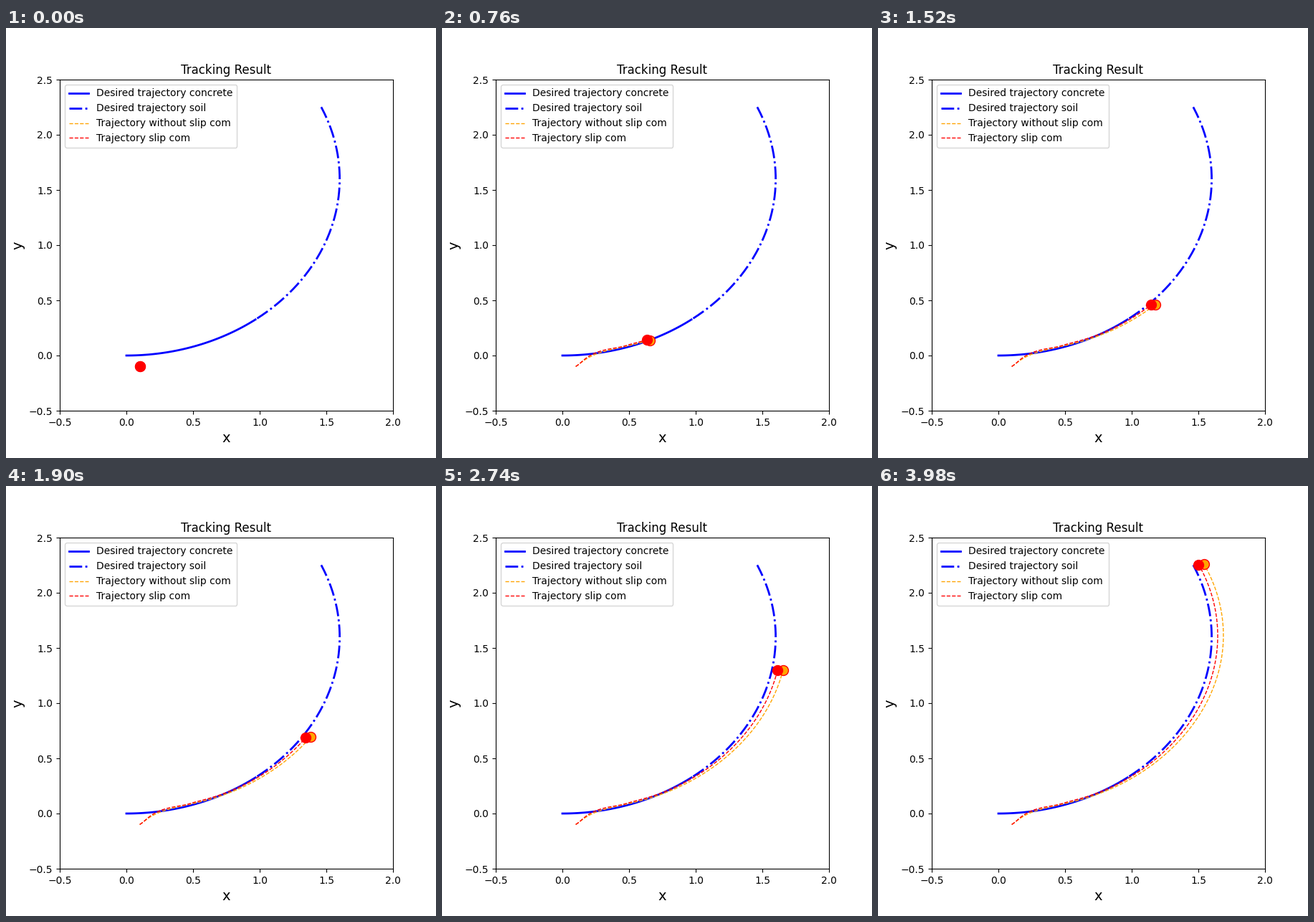
Animation of 600x600 px, one loop 4000 ms. Source, as a matplotlib script:

```python
import numpy as np
import matplotlib.pyplot as plt
from matplotlib.animation import FuncAnimation

FRAMES, INTERVAL = 200, 20
RADIUS = 1.6
SPLIT = 66  # concrete turns into soil here
START_ERROR = 0.1

step = np.arange(FRAMES)
theta = step * 0.01
goal_x = RADIUS * np.sin(theta)
goal_y = RADIUS * (1 - np.cos(theta))


def track(slip_x, slip_y, bend, power, catch_up, sharpness, rise):
    """Robot path: the desired arc, plus a fading start error and lasting slip."""
    lead = START_ERROR / (1 + (step / catch_up) ** sharpness)
    swing = (rise * step - START_ERROR) * np.exp(-step / 11)
    drift_x = slip_x * np.sin(bend * theta) ** power
    drift_y = slip_y * np.sin(1.45 * theta)
    return goal_x + lead + drift_x, goal_y + swing + drift_y


no_slip_com = track(slip_x=0.088, slip_y=0.023, bend=1.05, power=0.5,
                    catch_up=20, sharpness=4, rise=0.0135)
slip_com = track(slip_x=0.046, slip_y=0.020, bend=1.2, power=0.3,
                 catch_up=25, sharpness=8, rise=0.017)

fig, ax = plt.subplots(figsize=(6, 6), dpi=100)
ax.set(xlim=(-0.5, 2), ylim=(-0.5, 2.5))
ax.set_title("Tracking Result")
ax.set_xlabel("x", fontsize=14)
ax.set_ylabel("y", fontsize=14)

ax.plot(goal_x[:SPLIT], goal_y[:SPLIT], "b-", lw=2,
        label="Desired trajectory concrete")
ax.plot(goal_x[SPLIT:], goal_y[SPLIT:], "b-.", lw=2,
        label="Desired trajectory soil")


def robot(path, color, label):
    line, = ax.plot([], [], "--", color=color, lw=1, label=label)
    marker, = ax.plot([], [], "o", ms=10, mfc=color, mec="red")
    return path, line, marker


robots = [
    robot(no_slip_com, "orange", "Trajectory without slip com"),
    robot(slip_com, "red", "Trajectory slip com"),
]
ax.legend(loc="upper left")


def update(i):
    for (x, y), line, marker in robots:
        line.set_data(x[:i + 1], y[:i + 1])
        marker.set_data(x[i:i + 1], y[i:i + 1])
    return [artist for _, *artists in robots for artist in artists]


anim = FuncAnimation(fig, update, frames=FRAMES, interval=INTERVAL,
                     repeat=True, repeat_delay=0)
plt.show()
```
